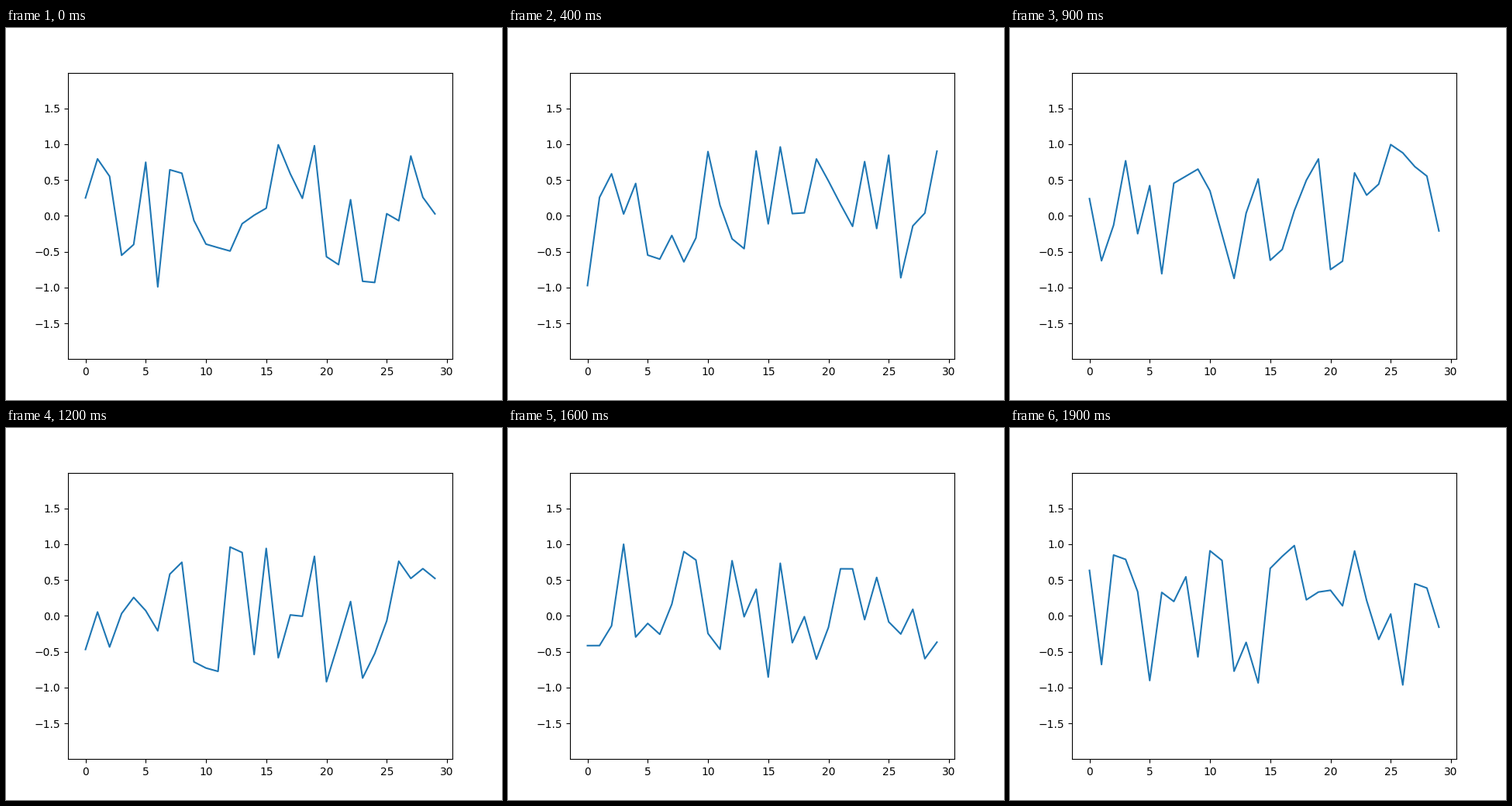
Write a matplotlib script that moves like this. It is 640x480 px and loops after 2000 ms.

```python
import numpy as np
import matplotlib.pyplot as plt
from matplotlib.animation import FuncAnimation

FRAMES = 20
INTERVAL = 100
POINTS = 30
Y_LIMIT = 1.9957

# Every step shows a fresh row of uniform noise.
rng = np.random.default_rng(7)
noise = rng.uniform(-1, 1, (FRAMES, POINTS))
noise *= Y_LIMIT / 2 / np.abs(noise).max()

fig, ax = plt.subplots(figsize=(6.4, 4.8), dpi=100)
line, = ax.plot(np.arange(POINTS), noise[0])
ax.set_ylim(-Y_LIMIT, Y_LIMIT)


def update(step):
    line.set_ydata(noise[step])
    return line,


anim = FuncAnimation(fig, update, frames=FRAMES, interval=INTERVAL,
                     repeat=True, repeat_delay=0)
plt.show()
```
